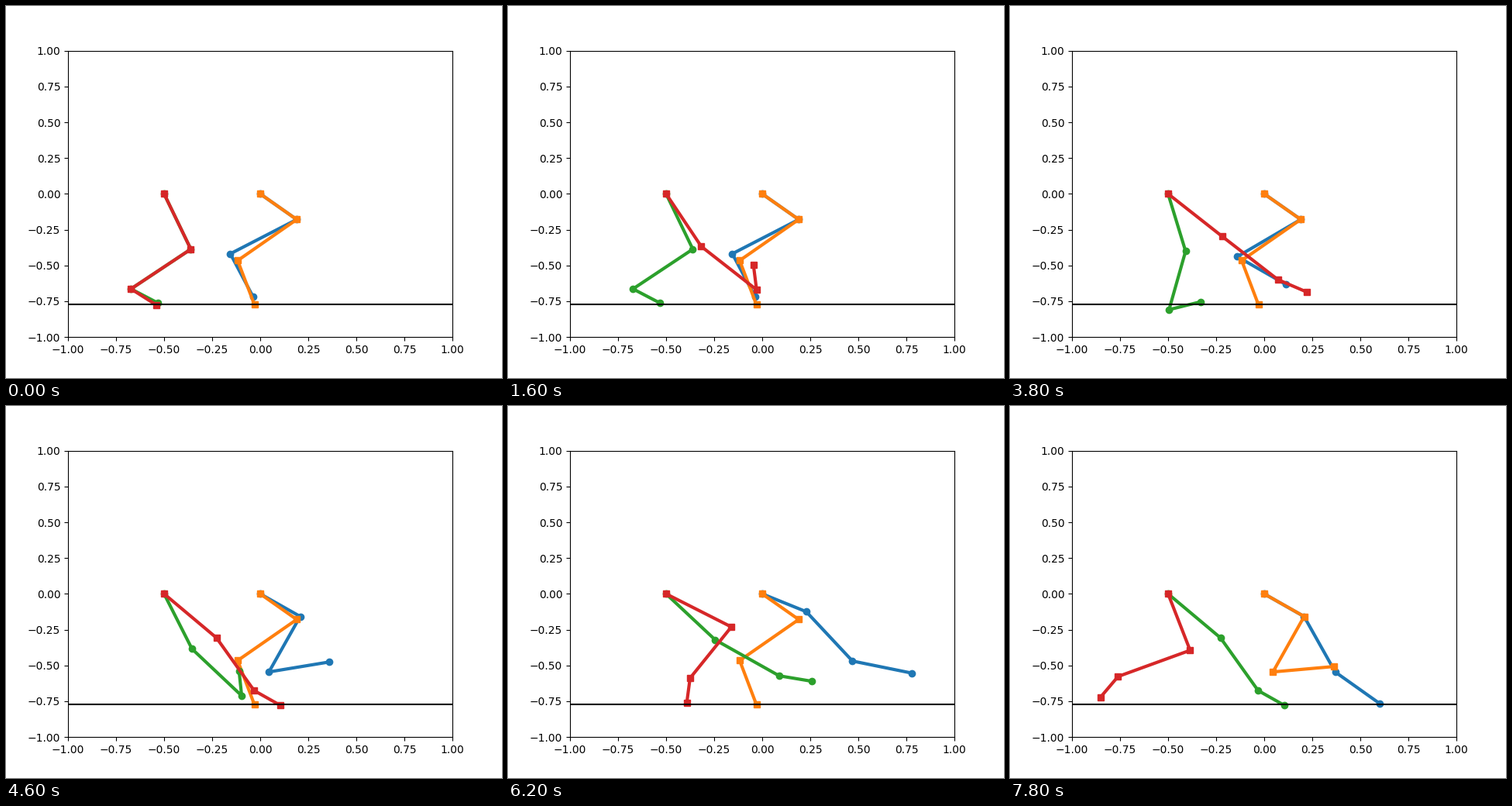
Recreate the animation shown at these times as a matplotlib script. Size 640 px wide and 480 px high, loop 8 s.

```python
import numpy as np
import matplotlib.pyplot as plt
from matplotlib.animation import FuncAnimation

FRAMES, STEP_MS = 40, 200
GROUND = -0.77

# Key poses: frames since lift-off -> absolute segment angles in degrees
HIND = {
    0: (-70.2, -138.3, -35.1),
    5: (-81, -71, 64),
    8: (-63.5, -46.4, 100.7),
    15: (-51.5, -37, -12.6),
    20: (-46.2, -49.5, -30),
    23: (-48.4, -62, -37.1),
    31: (-34.2, -121, -95.7),
    39: (-73.8, -154, -122.3),
}
FORE = {
    0: (-43.3, -145.3, -68.5),
    4: (-43.1, -139.5, -24.7),
    8: (-35.3, -103.5, 17),
    17: (-28, -51, -25),
    23: (-37.3, -67.3, -43.6),
}
HIND_LEN = (0.4105, 0.417, 0.173)
FORE_LEN = (0.261, 0.42, 0.32)

# root x, segment lengths, poses, lift-off frame, rest bend, foot tilt, marker
LEGS = [
    (0.0, FORE_LEN, FORE, 16, 0, 0, "o"),
    (0.0, FORE_LEN, FORE, 32, 8.3, -5.7, "s"),
    (-0.5, HIND_LEN, HIND, 16, 0, 0, "o"),
    (-0.5, HIND_LEN, HIND, 0, 0, -5.3, "s"),
]


def pose(keys, t):
    """Monotone cubic blend of key poses, starting from rest."""
    x = np.array(list(keys), float)
    y = np.array(list(keys.values()), float)
    h = np.diff(x)
    d = np.diff(y, axis=0) / h[:, None]
    m = np.zeros_like(y)
    m[-1] = d[-1]
    for i in range(1, len(d)):
        a, b = d[i - 1], d[i]
        w1, w2 = 2 * h[i] + h[i - 1], h[i] + 2 * h[i - 1]
        same = a * b > 0
        m[i, same] = (w1 + w2) / (w1 / a[same] + w2 / b[same])

    i = min(np.searchsorted(x, t, side="right") - 1, len(h) - 1)
    s = (t - x[i]) / h[i]
    return (y[i] + (y[i + 1] - y[i]) * s * s * (3 - 2 * s)
            + h[i] * s * (1 - s) * ((1 - s) * m[i] - s * m[i + 1]))


def joints(leg, frame):
    root, lengths, keys, start, bend, tilt, _ = leg
    t = max(frame - start, 0)
    ang = pose(keys, t)
    ang[1] += bend * max(1 - t / 5, 0)
    ang[2] += tilt * np.clip((23 - t) / 8, 0, 1)
    ang = np.radians(ang)
    xs = root + np.cumsum(np.append(0, lengths * np.cos(ang)))
    ys = np.cumsum(np.append(0, lengths * np.sin(ang)))
    return xs, ys


fig, ax = plt.subplots(figsize=(6.4, 4.8), dpi=100)
ax.set_xlim(-1, 1)
ax.set_ylim(-1, 1)
lines = [ax.plot([], [], marker=leg[-1], ls="-", lw=3, color=f"C{i}")[0]
         for i, leg in enumerate(LEGS)]
ax.axhline(GROUND, color="black")


def update(frame):
    for line, leg in zip(lines, LEGS):
        line.set_data(*joints(leg, frame))
    return lines


anim = FuncAnimation(fig, update, frames=FRAMES, interval=STEP_MS,
                     init_func=lambda: update(0), repeat=True,
                     repeat_delay=0, blit=False)
plt.show()
```
